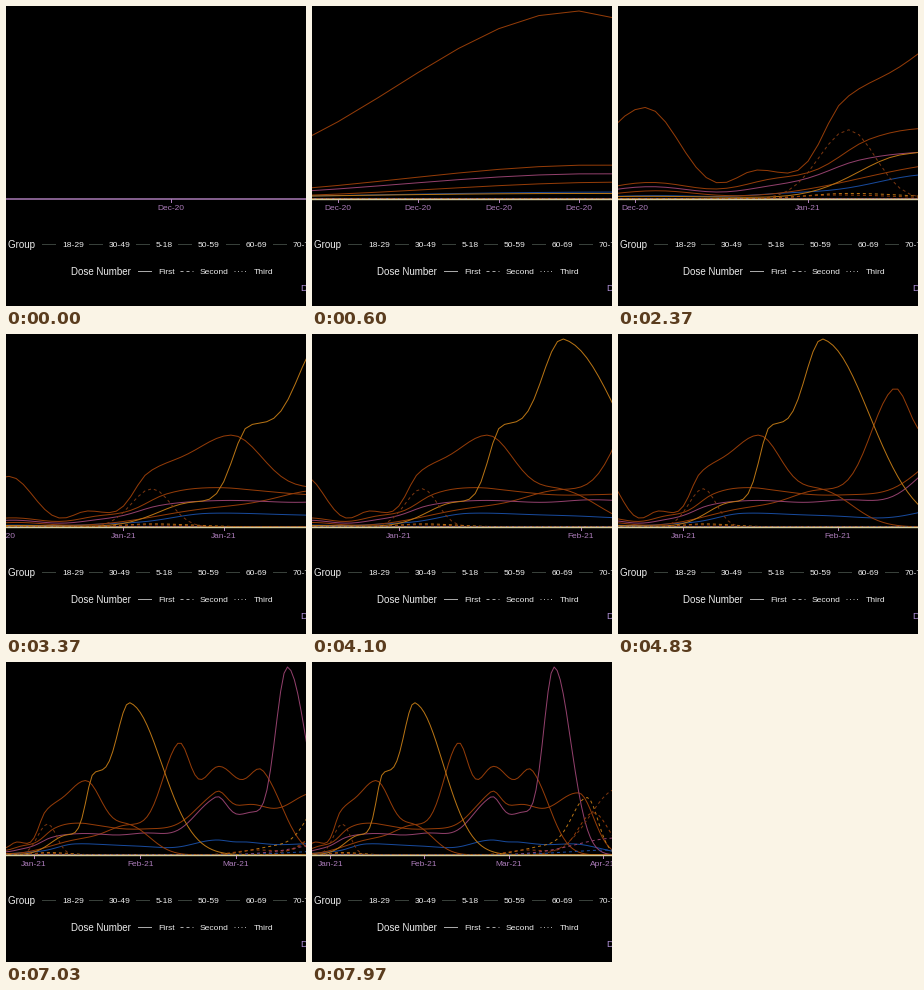
A matplotlib script that plays this animation: 300x300 px, repeating every 8000 ms.

```python
import numpy as np
import matplotlib.pyplot as plt
from matplotlib.animation import FuncAnimation

SIZE, DPI = 300, 100
PX = 72 / DPI                      # points per pixel
FRAMES, TICK_MS = 400, 20
STEPS_PER_SEC = 30                 # the chart moves on 30 times a second
DAY0, DAYS_PER_SEC = -24, 18.2     # day 0 is 1 January 2021
LEFT, WIDTH = -54.3, 438.6         # data panel, wider than the stage
BASE, HEIGHT = 193, 188
DAYS = np.arange(DAY0, 126)

RUST, ORANGE, PLUM, BLUE = "#943c08", "#b87414", "#92406c", "#184a9c"
MAUVE, CREAM, PALE = "#ac7cba", "#d4cc9c", "#ececec"
DASH, DOT = (0, (3, 3)), (0, (1, 2.5))

fig = plt.figure(figsize=(SIZE / DPI, SIZE / DPI), dpi=DPI, facecolor="black")
ax = fig.add_axes([0, 0, 1, 1])
ax.set_xlim(0, SIZE)
ax.set_ylim(SIZE, 0)
ax.axis("off")


def stroke(x, y, color, style="-", width=1.0, z=2):
    return ax.plot(x, y, color=color, ls=style, lw=width * PX, zorder=z,
                   dash_capstyle="butt")[0]


def write(x, y, text, color, size, ha="left"):
    return ax.text(x, y, text, color=color, fontsize=size * PX, ha=ha,
                   va="center_baseline", family="Liberation Sans")


def wave(peak, height, rise, fall):
    """Lopsided bell curve: one wave of vaccinations."""
    width = np.where(DAYS < peak, rise, fall)
    return height * np.exp(-0.5 * ((DAYS - peak) / width) ** 2)


series = []


def add(color, style, *waves):
    values = sum(wave(*w) for w in waves)
    series.append((stroke([], [], color, style, z=3), values))


# first doses
add(BLUE, "-", (-15, 1.5, 6, 5), (-2, 2, 4, 4), (12, 10.5, 6, 10),
    (32, 7, 9, 9), (53, 14, 7, 5), (63, 9, 4, 6), (80, 11, 9, 9))
add(RUST, "-", (-15, 3.6, 4.5, 4), (14, 15, 9, 9), (28, 24, 6, 6),
    (42, 98, 5, 3.5), (54, 88, 6, 7), (67, 68, 4, 6))
add(RUST, "-", (-15.5, 7.4, 4.8, 4.5), (-3, 8, 3.5, 4), (6, 16, 3.5, 5),
    (16, 28, 7, 10), (36, 20, 8, 8), (53, 52, 7, 3.5), (62, 40, 5, 6),
    (82, 62, 10, 5))
add(PLUM, "-", (-15.5, 5.5, 4.8, 4.5), (-3, 4.5, 3.5, 4), (5, 9, 3.5, 5),
    (16, 20, 8, 9), (34, 18, 7, 7), (53, 52, 7, 3.5), (63, 40, 5, 4),
    (74, 187, 3.6, 5.5))
add(RUST, "-", (-16, 41, 4.5, 3.4), (-5, 12, 2.2, 3.2), (3.5, 28, 2.2, 4),
    (15, 73, 6.6, 5), (28, 28, 5, 6))
add(ORANGE, "-", (-16, 1.2, 6, 9), (10, 20, 5, 5), (17.5, 68, 2.3, 4),
    (28, 150, 4.3, 9.3))

# second doses
add("#7a3610", DASH, (4, 31, 2.9, 2.6), (95, 66, 9, 9))
add(ORANGE, DASH, (4, 2.5, 4, 6), (72, 9, 8, 8), (85, 55, 5, 3.5))
add(RUST, DASH, (3, 1.8, 4, 6), (65, 5, 6, 9), (87, 42, 5, 5))
add(PLUM, DASH, (95, 17, 14, 9))
add(BLUE, DASH, (93, 5, 15, 9))

# series that stay at nought
zero_lines = [stroke([0, SIZE], [BASE, BASE], CREAM, "-", 1.4, 4),
              stroke([0, SIZE], [BASE - 1, BASE - 1], ORANGE, DASH, .6, 5)]

top_so_far = np.maximum.accumulate(np.max([v for _, v in series], axis=0))

# axis
stroke([0, SIZE], [BASE, BASE], MAUVE, "-", 1.5, 1)
ticks = [(stroke([], [], MAUVE), write(0, 201.5, "", MAUVE, 8.4, "center"))
         for _ in range(12)]

# legends
write(29, 238.5, "Age Group", PALE, 9.8, "right")
for x, name in zip((36, 83, 130, 172, 220, 267),
                   ("18-29", "30-49", "5-18", "50-59", "60-69", "70-79")):
    stroke([x, x + 13], [238, 238], "#38403a")
    write(x + 20, 238.5, name, PALE, 8.5)
write(65, 265, "Dose Number", PALE, 9.8)
for x, name, style in ((132, "First", "-"), (174, "Second", DASH),
                       (228, "Third", DOT)):
    stroke([x, x + 13], [264.5, 264.5], "#a8a8a8", style)
    write(x + 20, 265, name, PALE, 8.5)
write(294.5, 281.5, "D", "#b090d8", 9.5)

MONTHS = (-31, 0, 31, 59, 90, 120)
NAMES = ("Dec-20", "Jan-21", "Feb-21", "Mar-21", "Apr-21", "May-21")


def breaks(span):
    """Axis dates: months, half months, weeks from Monday, or shorter steps."""
    end = DAY0 + span
    if span > 72:
        days = MONTHS
    elif span > 36:
        days = sorted(MONTHS + tuple(m + 14 for m in MONTHS))
    elif span > 13.5:
        days = np.arange(DAY0 - 1, end, 7)
    else:
        step = 2.0 ** np.ceil(np.log2(max(span, 1) / 7))
        days = np.arange(DAY0, end + step, step)
    return [d for d in days if DAY0 <= d <= end]


def label(day):
    return NAMES[np.searchsorted(MONTHS, day, side="right") - 1]


def draw(i):
    step = round(i * TICK_MS * STEPS_PER_SEC / 1000)
    span = DAYS_PER_SEC * step / STEPS_PER_SEC
    end = DAY0 + span

    def to_x(day):
        share = (day - DAY0) / span if span else 0.5
        return LEFT + WIDTH * share

    n = np.count_nonzero(DAYS < end)
    days = np.append(DAYS[:n], end)
    tips = [np.interp(end, DAYS, v) for _, v in series]
    top = max(max(tips), top_so_far[max(n - 1, 0)])
    for (line, values), tip in zip(series, tips):
        line.set_visible(n > 0)
        if n:
            heights = np.append(values[:n], tip)
            line.set_data(to_x(days), BASE - heights * HEIGHT / top)
    for line in zero_lines:
        line.set_visible(n > 0)

    marks = breaks(span)
    for k, (tick, text) in enumerate(ticks):
        on = k < len(marks)
        tick.set_visible(on)
        text.set_visible(on)
        if on:
            x = to_x(marks[k])
            tick.set_data([x, x], [BASE, BASE + 3])
            text.set_position((x, 201.5))
            text.set_text(label(marks[k]))
    return []


anim = FuncAnimation(fig, draw, frames=FRAMES, interval=TICK_MS,
                     repeat=True, repeat_delay=0, blit=False)
plt.show()
```
